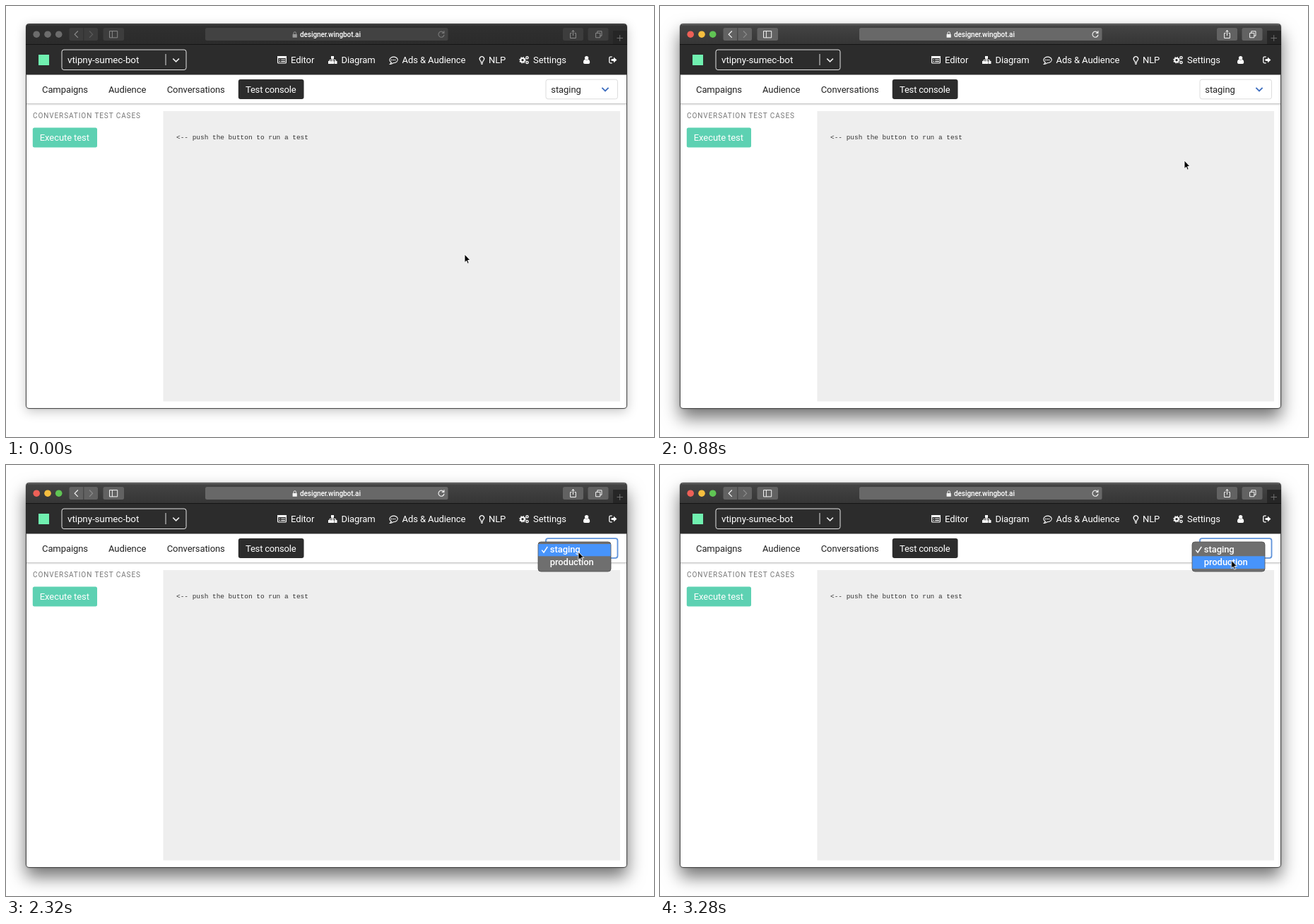
An HTML page for the animation above (3.36 s loop, 917 by 611 pixels).

```html
<!DOCTYPE html>
<html lang="en">
<head>
<meta charset="utf-8">
<title>Test console</title>
<style>
html, body { margin: 0; width: 917px; height: 611px; overflow: hidden; background: #fff; }
#stage { position: relative; width: 917px; height: 611px; overflow: hidden; animation: wake 3.36s step-end infinite; }
.window { position: absolute; left: 28px; top: 25px; width: 851px; height: 546px; border-radius: 5px; background: #fff; box-shadow: var(--shadow); }
svg { position: absolute; inset: 0; }
text { font: 13px Roboto, sans-serif; letter-spacing: -.08px; fill: #222; }
.light { fill: #fff; }
.menu text { font-weight: 500; fill: #fff; }
.icon { fill: none; stroke: #fff; stroke-width: 1.2; }
.icon .solid { fill: #fff; stroke: none; }
.btn { fill: var(--btn); }
.glyph { fill: none; stroke: var(--glyph); stroke-width: 1.2; }

.cursor { animation: glide 3.36s infinite; }
.hand, .arrow, .menu, .first, .second { animation: 3.36s step-end infinite; }
.hand { animation-name: hover; }
.arrow { animation-name: rest; }
.menu { animation-name: open; }
.first { animation-name: leave; }
.second { animation-name: enter; }

/* the window gains focus, then the page finishes loading */
@keyframes wake {
  0%, 100% {
    --shadow: 0 4px 16px rgba(0,0,0,.22), 0 0 2px rgba(0,0,0,.3);
    --top: #303030; --bottom: #2b2b2b; --edge: #484848; --btn: #3d3d3d; --field: #424242;
    --glyph: #8c8c8c; --dim: #5c5c5c; --lock: #999; --reload: #777;
    --red: #6c6c6c; --yellow: #6c6c6c; --green: #6c6c6c;
  }
  9.52%, 11.9% {
    --shadow: 0 13px 24px rgba(0,0,0,.55), 0 0 2px rgba(0,0,0,.4);
    --top: #454545; --bottom: #353535; --edge: #6c6c6c; --btn: #626262; --field: #686868;
    --glyph: #f4f4f4; --dim: #8c8c8c; --lock: #999; --reload: #858585;
    --red: #ed6057; --yellow: #f5be3f; --green: #60c554;
  }
  11.9% { --lock: #f4f4f4; --reload: #eee; }
}
@keyframes glide {
  0% { transform: translate(649px, 352px); }
  11.9% { transform: translate(649px, 352px); animation-timing-function: steps(2); }
  16.66% { transform: translate(656px, 341px); animation-timing-function: steps(1); }
  19.04% { transform: translate(664px, 330px); animation-timing-function: steps(3); }
  26.19% { transform: translate(742px, 219px); animation-timing-function: steps(2); }
  30.95% { transform: translate(774px, 173px); animation-timing-function: steps(3); }
  38.09% { transform: translate(803px, 128px); animation-timing-function: steps(2); }
  42.85% { transform: translate(809px, 115px); }
  64.28% { transform: translate(809px, 115px); animation-timing-function: steps(5); }
  76.19% { transform: translate(811px, 135px); }
  80.95% { transform: translate(811px, 135px); animation-timing-function: steps(2); }
  85.71%, 100% { transform: translate(808.5px, 135px); }
}
@keyframes hover { 0%, 54.76%, 100% { opacity: 0; } 38.09% { opacity: 1; } }
@keyframes rest { 0%, 54.76%, 100% { opacity: 1; } 38.09% { opacity: 0; } }
@keyframes open { 0% { opacity: 0; } 54.76%, 100% { opacity: 1; } }
@keyframes leave { 0% { opacity: 1; } 73.8%, 100% { opacity: 0; } }
@keyframes enter { 0% { opacity: 0; } 73.8%, 100% { opacity: 1; } }
</style>
</head>
<body>
<div id="stage">
<div class="window"></div>
<svg width="917" height="611" viewBox="0 0 917 611">
  <defs>
    <linearGradient id="bar" x2="0" y2="1">
      <stop style="stop-color: var(--top)"/>
      <stop offset="1" style="stop-color: var(--bottom)"/>
    </linearGradient>
  </defs>

  <!-- title bar -->
  <path d="M28 55V30Q28 25 33 25H874Q879 25 879 30V55Z" fill="url(#bar)"/>
  <path d="M31 26.5H876" style="stroke: var(--edge)"/>
  <path d="M859 54V35H879V54Z" fill="#262626"/>
  <path d="M28 54.5H879" stroke="#151515"/>
  <path d="M864.5 45.5H873M868.7 41.2V49.8" stroke="#707070"/>
  <circle cx="43.2" cy="40.2" r="4.8" style="fill: var(--red)"/>
  <circle cx="59" cy="40.2" r="4.8" style="fill: var(--yellow)"/>
  <circle cx="74.7" cy="40.2" r="4.8" style="fill: var(--green)"/>
  <g class="btn">
    <path d="M92 31H109.3V49H92Q89.5 49 89.5 46.5V33.5Q89.5 31 92 31ZM110.3 31H127.5Q130 31 130 33.5V46.5Q130 49 127.5 49H110.3Z"/>
    <rect x="137.5" y="31" width="29.5" height="18" rx="2.5"/>
    <rect x="788" y="31" width="29" height="18" rx="2.5"/>
    <rect x="823.5" y="31" width="29" height="18" rx="2.5"/>
  </g>
  <rect x="282" y="31" width="343.5" height="18" rx="2.5" style="fill: var(--field)"/>
  <g class="glyph">
    <path d="M101.8 35.5L97.2 40.2L101.8 44.9"/>
    <path d="M118 35.5L122.6 40.2L118 44.9" style="stroke: var(--dim)"/>
    <path d="M146.5 35.6H157.7V44.9H146.5ZM150.4 35.6V44.9" stroke-width="1"/>
    <path d="M800.5 38.5H798.6V45.5H806.4V38.5H804.5M802.5 42V34.5M800.3 36.6L802.5 34.4L804.7 36.6" stroke-width="1"/>
    <path d="M834.6 38.4H840.8V44.8H834.6ZM836.8 38.4V35.8H843V42.3H840.8" stroke-width="1"/>
    <path d="M619.2 37.8A4 4 0 1 0 620 40.6M619.9 35.2V38.3H616.8" style="stroke: var(--reload)"/>
  </g>
  <rect x="405.6" y="40" width="6.2" height="4.8" rx=".6" style="fill: var(--lock)"/>
  <path d="M407 40V38.4A1.7 1.7 0 0 1 410.4 38.4V40" fill="none" style="stroke: var(--lock)"/>
  <text x="416" y="44" class="light" style="font-size: 10px; font-weight: 500">designer.wingbot.ai</text>

  <!-- navigation -->
  <path d="M28 55H879V97.5H28Z" fill="#2c2c2c"/>
  <rect x="46" y="69" width="15" height="15" fill="#70f0b0"/>
  <rect x="79" y="62" width="176" height="28.5" rx="3" fill="none" stroke="#e4e4e4"/>
  <path d="M226 68V84" stroke="#ddd"/>
  <path d="M236.3 74.6L240.6 78.9L244.9 74.6" fill="none" stroke="#eee" stroke-width="1.5"/>
  <g class="light">
    <text x="87" y="81" class="light" style="font-size: 13.4px">vtipny-sumec-bot</text>
    <text x="403" y="81" class="light">Editor</text>
    <text x="474.5" y="81" class="light">Diagram</text>
    <text x="560.5" y="81" class="light">Ads &amp; Audience</text>
    <text x="683" y="81" class="light">NLP</text>
    <text x="746" y="81" class="light">Settings</text>
  </g>
  <g class="icon">
    <rect x="384.6" y="71.6" width="11.8" height="9.4" rx="1"/>
    <path class="solid" d="M384 71H397V74H384Z"/>
    <path d="M386.5 76H388M389.2 76H395M386.5 78.6H388M389.2 78.6H395"/>
    <path class="solid" d="M460 71H464V75H460ZM456 78H460V82H456ZM460.1 78H464V82H460.1ZM464.6 78H468.5V82H464.6Z"/>
    <path d="M462 74V78M458 78.5V76.5H466.5V78.5" stroke-width="1"/>
    <path d="M545.4 80A5.7 4.3 0 1 1 548 80.7Q546 82.3 543.5 82.4Q545 81.2 545.4 80Z" stroke-width="1.1"/>
    <path d="M544.8 76.5H546.2M547.3 76.5H548.7M549.8 76.5H551.2" stroke-width="1.4"/>
    <path d="M672 79Q671.8 78 670.8 76.8A3.2 3.2 0 1 1 676 76.8Q675 78 674.8 79Z"/>
    <path d="M671.8 80.7H675M672.4 82.3H674.5"/>
    <circle cx="731" cy="76.8" r="2.7" stroke-width="2"/>
    <circle cx="731" cy="76.8" r="4.1" stroke-width="1.3" stroke-dasharray="1.6 1.62"/>
    <circle cx="737.5" cy="73.2" r="1.6" stroke-width="1.4"/>
    <circle cx="737.5" cy="80" r="1.6" stroke-width="1.4"/>
    <circle class="solid" cx="821.6" cy="73.7" r="2.7"/>
    <path class="solid" d="M819.3 75.8Q821.6 77.6 823.9 75.8Q826.3 76.4 826.2 80.2Q826 82 824.4 82H818.8Q817.2 82 817 80.2Q816.9 76.4 819.3 75.8Z"/>
    <path d="M857.8 72.2H855.3Q853.8 72.2 853.8 73.7V79.3Q853.8 80.8 855.3 80.8H857.8" stroke-width="1.3"/>
    <path class="solid" d="M856.6 75H860V72.4L864.4 76.5L860 80.6V78H856.6Z"/>
  </g>

  <!-- tabs -->
  <path d="M28 138.5H879" stroke="#cbcbcb"/>
  <path d="M28 139.5H879" stroke="#e4e4e4"/>
  <path d="M28 140.5H879" stroke="#f4f4f4"/>
  <rect x="328.8" y="104" width="92.7" height="28" rx="3" fill="#2c2c2c"/>
  <text x="51" y="122.7">Campaigns</text>
  <text x="145" y="122.7">Audience</text>
  <text x="227.7" y="122.7">Conversations</text>
  <text x="339" y="122.7" class="light" style="letter-spacing: -.2px">Test console</text>
  <rect x="764" y="104.2" width="101.5" height="27.6" rx="3" fill="#fff" stroke="#dcdcdc"/>
  <text x="771.3" y="122.7">staging</text>
  <path d="M843.4 115.8L848 120.4L852.6 115.8" fill="none" stroke="#3f6fc0" stroke-width="1.9"/>

  <!-- content -->
  <text x="38" y="159" style="font-size: 10px; letter-spacing: .91px; fill: #777">CONVERSATION TEST CASES</text>
  <rect x="37.8" y="172.6" width="91.2" height="28" rx="2.5" fill="#5dd1b2"/>
  <text x="47.8" y="191.3" class="light">Execute test</text>
  <path d="M222.5 149H869V560.5H222.5Z" fill="#eee"/>
  <text x="241" y="189" style="font: 9.45px 'Liberation Mono', monospace; letter-spacing: 0; fill: #333">&lt;-- push the button to run a test</text>
  <path d="M28.5 97V566Q28.5 570.5 33 570.5H874Q878.5 570.5 878.5 566V97" fill="none" stroke="#484848"/>

  <!-- drop-down menu -->
  <g class="menu">
    <rect x="764" y="104.2" width="101.5" height="27.6" rx="3" fill="#fff" stroke="#5f93da" stroke-width="1.8"/>
    <rect x="753" y="109" width="103" height="42" rx="4" fill="#6f6f6f" stroke="#4c4c4c" stroke-width=".8"/>
    <path class="first" d="M753.4 112H855.6V129.3H753.4Z" fill="#4794fb"/>
    <path class="second" d="M753.4 129.3H855.6V147H753.4Z" fill="#4794fb"/>
    <path d="M758.3 120.6L761 124L766.3 115.8" fill="none" stroke="#fff" stroke-width="1.5"/>
    <text x="769.8" y="124.2">staging</text>
    <text x="769.8" y="141.8">production</text>
  </g>

  <g class="cursor">
    <path class="arrow" d="M0 0V11.6L2.6 9.2L4.3 13.2L6.2 12.4L4.5 8.5H8Z" fill="#000" stroke="#fff" stroke-width=".9"/>
    <path class="hand" d="M-1.2 1Q0 -.6 1.2 1V5Q2.5 4 3.4 5.2Q4.8 4.6 5.4 5.8Q7 5.5 7 7V9.5Q6.6 11 6 13H0Q-1 11 -3 9Q-5 7 -3.5 6.5Q-2.2 6.3 -1.2 8Z" fill="#fff" stroke="#000" stroke-width="1"/>
  </g>
</svg>
</div>
</body>
</html>
```
